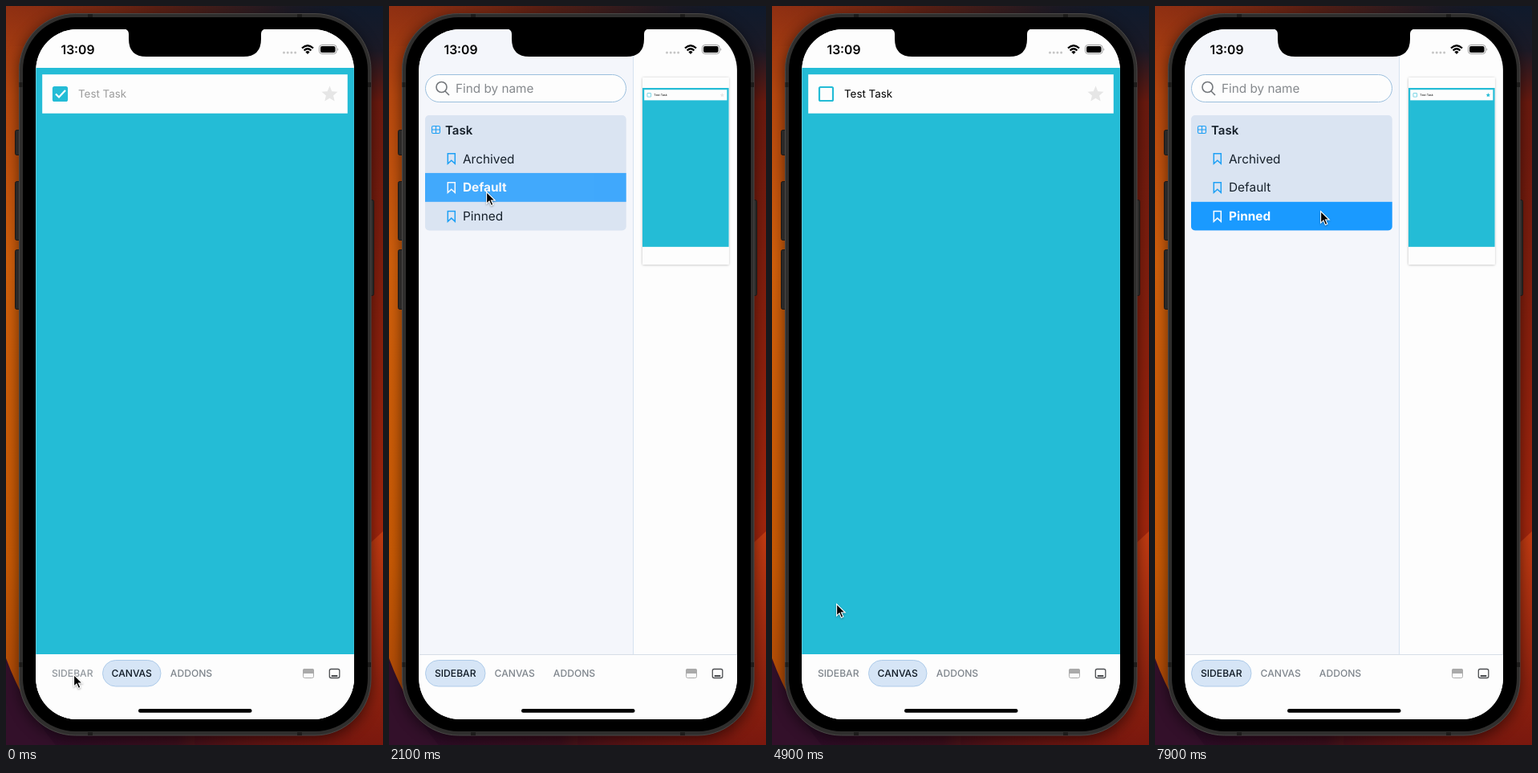
An HTML page that plays this animation: 470x920 px, repeating every 8 s.

```html
<!DOCTYPE html>
<html lang="en">
<head>
<meta charset="utf-8">
<title>Phone component browser</title>
<style>
  html, body { margin: 0; width: 100%; height: 100%; overflow: hidden; background: #4a1712; }
  svg { display: block; width: 470px; height: 920px; }
  text { font-family: Inter, "Open Sans", sans-serif; text-rendering: geometricPrecision; white-space: pre; }
  .line { fill: none; stroke: #1ea0f5; stroke-width: 1.5; }
  .row { font-size: 15.4px; fill: #16202b; }
  .row rect { fill: none; }
  .row.on { font-weight: 700; fill: #fff; }
  .row.on rect { fill: #1a9aff; }
  .row.on .line { stroke: #fff; }
  .tab { font-size: 12.1px; font-weight: 500; fill: #7d848b; text-anchor: middle; }
  .tab rect { fill: none; }
  .tab.on { fill: #0c1722; }
  .tab.on rect { fill: #d6e5f6; stroke: #aecbe9; }
</style>
</head>
<body>
<svg viewBox="0 0 470 920">
  <defs>
    <linearGradient id="left" x2="0" y2="1">
      <stop stop-color="#8f2f12"/><stop offset=".12" stop-color="#b8480f"/>
      <stop offset=".35" stop-color="#d2600c"/><stop offset=".75" stop-color="#c95a05"/>
      <stop offset="1" stop-color="#a84508"/>
    </linearGradient>
    <linearGradient id="right" x2="0" y2="1">
      <stop stop-color="#0f1a2c"/><stop offset=".06" stop-color="#1c1a26"/>
      <stop offset=".13" stop-color="#6b1a0f"/><stop offset=".45" stop-color="#8a200d"/>
      <stop offset=".7" stop-color="#a3260d"/><stop offset="1" stop-color="#7a180e"/>
    </linearGradient>
    <linearGradient id="flare" x2="0" y2="1">
      <stop stop-color="#c43c12"/><stop offset="1" stop-color="#7a180e"/>
    </linearGradient>
    <linearGradient id="top">
      <stop stop-color="#7c2a12" stop-opacity="0"/><stop offset=".4" stop-color="#5c2014"/>
      <stop offset=".75" stop-color="#1d1a25"/><stop offset="1" stop-color="#0f1a2c" stop-opacity="0"/>
    </linearGradient>
    <linearGradient id="bottom">
      <stop stop-color="#2c0c28"/><stop offset=".4" stop-color="#3d0f1d"/>
      <stop offset="1" stop-color="#7a180e" stop-opacity="0"/>
    </linearGradient>
    <clipPath id="screen"><rect x="37.300" y="29" width="396.600" height="859" rx="51"/></clipPath>
    <clipPath id="list"><rect x="45" y="136" width="250.700" height="143.500" rx="5"/></clipPath>
    <filter id="glow" x="-20%" y="-10%" width="140%" height="120%">
      <feGaussianBlur stdDeviation="9"/>
    </filter>
    <filter id="shadow" x="-10%" y="-10%" width="120%" height="120%">
      <feDropShadow dx="0" dy="2" stdDeviation="6" flood-opacity=".28"/>
    </filter>
  </defs>

  <!-- wallpaper -->
  <rect width="235" height="920" fill="url(#left)"/>
  <rect x="235" width="235" height="920" fill="url(#right)"/>
  <path d="M430 692Q450 672 470 654V920H430z" fill="url(#flare)"/>
  <rect width="470" height="50" fill="url(#top)"/>
  <rect x="40" y="880" width="430" height="40" fill="url(#bottom)"/>
  <path d="M0 812Q22 872 62 920H0z" fill="#33102a"/>

  <!-- phone body -->
  <rect x="16" y="14" width="439" height="898" rx="70" opacity=".55" filter="url(#glow)"/>
  <g fill="#2b2928" stroke="#1a1716">
    <rect x="11.5" y="154.5" width="8" height="31" rx="2"/>
    <rect x="11.5" y="218.5" width="8" height="73" rx="2"/>
    <rect x="11.5" y="303.5" width="8" height="74" rx="2"/>
    <rect x="450.5" y="241.5" width="8" height="119" rx="2"/>
  </g>
  <rect x="16.5" y="9.5" width="438.5" height="898.5" rx="70" fill="#2f2e2d" stroke="#494746"/>
  <path d="M102 12h6M363 12h6M102 906h6M363 906h6M18.5 95v6M453 95v6M18.5 817v6M453 817v6" stroke="#1d1c1b" stroke-width="4"/>
  <rect x="21" y="14" width="430" height="889" rx="66"/>

  <g clip-path="url(#screen)">
    <rect x="37" y="29" width="397" height="859" fill="#fdfdfd"/>

    <g id="sidebar">
      <rect x="37" y="29" width="268" height="779" fill="#f4f6fb"/>
      <path d="M304.5 29v779" stroke="#d5e2f0"/>
      <rect x="45.5" y="85.5" width="250" height="34" rx="17" fill="#fdfdfd" stroke="#9bbfdd"/>
      <path d="M59 101a6.5 6.5 0 1 0 13 0a6.5 6.5 0 1 0-13 0M70 106l5 5" fill="none" stroke="#73777b" stroke-width="1.6"/>
      <text x="83" y="108" font-size="15.3" fill="#85898d">Find by name</text>
      <g clip-path="url(#list)">
        <rect x="45" y="136" width="251" height="144" fill="#dae4f2"/>
        <path class="line" style="stroke-width:1.1" d="M55 149.5h7q1.5 0 1.5 1.5v6q0 1.5-1.5 1.5h-7q-1.5 0-1.5-1.5v-6q0-1.5 1.5-1.5zM58.5 149.500v9M53.500 154h10"/>
        <text x="70" y="159.5" font-size="15" font-weight="600" fill="#16202b">Task</text>
        <g id="rows"></g>
      </g>
    </g>

    <g id="preview">
      <rect id="cardShadow" x="37" y="29" width="397" height="859" rx="4" fill="#fdfdfd" filter="url(#shadow)"/>
      <rect x="37" y="29" width="397" height="859" rx="4" fill="#fdfdfd"/>
      <rect x="37" y="77" width="397" height="730" fill="#24bcd6"/>
      <rect x="45.2" y="85.2" width="380.6" height="48.5" fill="#fdfdfd"/>
      <rect id="box" x="59" y="101" width="17" height="17" rx="1.5" stroke="#24bcd6" stroke-width="2.2"/>
      <path id="tick" d="M62 109.5l4 4 8-8.5" fill="none" stroke="#fff" stroke-width="2.2"/>
      <text id="title" x="90" y="114.3" font-size="13.4">Test Task</text>
      <path id="star" transform="translate(391.5 97.5)" d="M12 17.27 18.18 21l-1.64-7.03L22 9.24l-7.19-.61L12 2 9.19 8.63 2 9.24l5.46 4.73L5.82 21z"/>
    </g>

    <rect x="37" y="807" width="397" height="81" fill="#fdfdfd"/>
    <path id="border" d="M37 807.5h397" stroke="#d7dee7"/>
    <g id="tabs"></g>
    <rect x="370.5" y="825.5" width="13" height="11" rx="2" fill="#fdfdfd" stroke="#aaa"/>
    <path d="M370 831v-4q0-2 2-2h10q2 0 2 2v4z" fill="#aaa"/>
    <rect x="403.3" y="825.5" width="12.5" height="11" rx="2" fill="none" stroke="#4b4d50" stroke-width="1.3"/>
    <path d="M405.7 834h7.6" stroke="#4b4d50" stroke-width="2"/>
    <rect x="165" y="875" width="141.5" height="4.8" rx="2.4"/>

    <text x="68.5" y="60" font-size="15.7" font-weight="600">13:09</text>
    <path d="M346.5 58h.01m4.7 0h.01m4.7 0h.01m4.7 0h.01" stroke="#c6c6c6" stroke-width="3" stroke-linecap="round"/>
    <path d="M369 52.5q7-6.5 14 0M371.6 55.3q4.4-4 8.8 0" fill="none" stroke="#000" stroke-width="2.3"/>
    <path d="M373.4 57.2q2.6-2.2 5.2 0l-2.6 2.7z"/>
    <rect x="390.5" y="48.5" width="21.5" height="11" rx="3.3" fill="none" stroke="#999"/>
    <rect x="392" y="50" width="18.5" height="8" rx="2"/>
    <path d="M413.3 52.2q2 1.8 0 3.6z" fill="#999"/>
    <path d="M147 28.5q6 .5 6 6.5v6q0 22 22 22h121q22 0 22-22v-6q0-6 6-6.5z"/>
  </g>

  <path id="cursor" d="M.6.6v14.5l3.4-3.2 2.4 5.5 2.5-1.1-2.4-5.3h4.7z" stroke="#fff" stroke-width="1.1" style="filter:drop-shadow(0 1px 1px #0005)"/>
</svg>

<script>
const LOOP = 8000, SLIDE = 400, HOLD = 290, DIM = 150, FADE = 250;
const $ = id => document.getElementById(id);
const TEAL = '#24bcd6';

// Times at which the view toggles: to sidebar, to canvas, to sidebar.
const toggles = [244, 3398, 5878];
// Times at which each story is picked; the first one is preselected.
const picks = [-1000, 1940, 7300];
// Cursor stops: time, x, y.
const stops = [
  [0, 84, 832], [800, 84, 832], [1640, 121, 231], [2350, 121, 231],
  [3150, 335, 218], [3900, 335, 218], [4900, 80, 744], [5450, 84, 832],
  [5950, 84, 832], [6200, 118, 750], [7000, 206, 255], [LOOP, 206, 255]
];

const clamp = v => Math.min(1, Math.max(0, v));
const inOut = (t, power) => t < .5
  ? (2 * t) ** power / 2
  : 1 - (2 - 2 * t) ** power / 2;
const countPast = (times, t) => times.filter(start => t >= start).length;

$('rows').innerHTML = ['Archived', 'Default', 'Pinned'].map((name, i) =>
  `<g class="row" transform="translate(0 ${35.9 * i})"><rect x="45" y="172" width="251" height="35.9"/>
   <path class="line" d="M73.3 183.8h9v12.6l-4.5-4.1-4.5 4.1z"/><text x="92" y="195.5">${name}</text></g>`).join('');
$('tabs').innerHTML = [['SIDEBAR', 45.5, 74.5], ['CANVAS', 120.5, 72.5], ['ADDONS', 193.5, 75]].map(([name, x, w]) =>
  `<g class="tab"><rect x="${x}" y="814.5" width="${w}" height="32.5" rx="16.2"/>
   <text x="${x + w / 2}" y="835.4">${name}</text></g>`).join('');
const rows = [...$('rows').children], tabs = [...$('tabs').children];

function openness(t) {
  const n = countPast(toggles, t);
  if (!n) return 0;
  const k = inOut(clamp((t - toggles[n - 1]) / SLIDE), 1.67);
  return n % 2 ? k : 1 - k;
}

// Opacity of a touched control: it dims while held and recovers on release.
function touchOpacity(t, release) {
  const dim = t < release
    ? inOut(clamp((t - release + HOLD) / DIM), 2)
    : 1 - inOut(clamp((t - release) / FADE), 2);
  return 1 - .8 * dim;
}

function cursorAt(t) {
  const i = stops.findIndex(stop => stop[0] > t);
  const [t0, x0, y0] = stops[i - 1], [t1, x1, y1] = stops[i];
  const k = inOut((t - t0) / (t1 - t0), 1.6);
  return [x0 + (x1 - x0) * k, y0 + (y1 - y0) * k];
}

function draw(t) {
  const p = openness(t);
  const story = countPast(picks, t) - 1;
  const tab = countPast(toggles, t) % 2 ? 0 : 1;

  $('sidebar').setAttribute('transform', `translate(${268 * (p - 1)} 0)`);
  $('preview').setAttribute('transform',
    `translate(${37 + 279 * p} ${29 + 60 * p}) scale(${1 - .729 * p}) translate(-37 -29)`);
  $('cardShadow').setAttribute('opacity', p * p);
  $('border').setAttribute('opacity', clamp(p * 10));

  rows.forEach((row, i) => {
    row.classList.toggle('on', i === story);
    row.setAttribute('opacity', touchOpacity(t, picks[i]));
  });
  tabs.forEach((el, i) => el.classList.toggle('on', i === tab));
  tabs[0].setAttribute('opacity',
    Math.min(touchOpacity(t, toggles[0]), touchOpacity(t, toggles[2])));

  const archived = story === 0;
  $('box').setAttribute('fill', archived ? TEAL : '#fdfdfd');
  $('tick').setAttribute('opacity', archived ? 1 : 0);
  $('title').setAttribute('fill', archived ? '#9b9b9b' : '#000');
  $('star').setAttribute('fill', story === 2 ? TEAL : '#e6e6e6');
  $('cursor').setAttribute('transform', `translate(${cursorAt(t)})`);
}

function tick(now) {
  draw(now % LOOP);
  requestAnimationFrame(tick);
}
draw(0);
requestAnimationFrame(tick);
</script>
</body>
</html>
```
